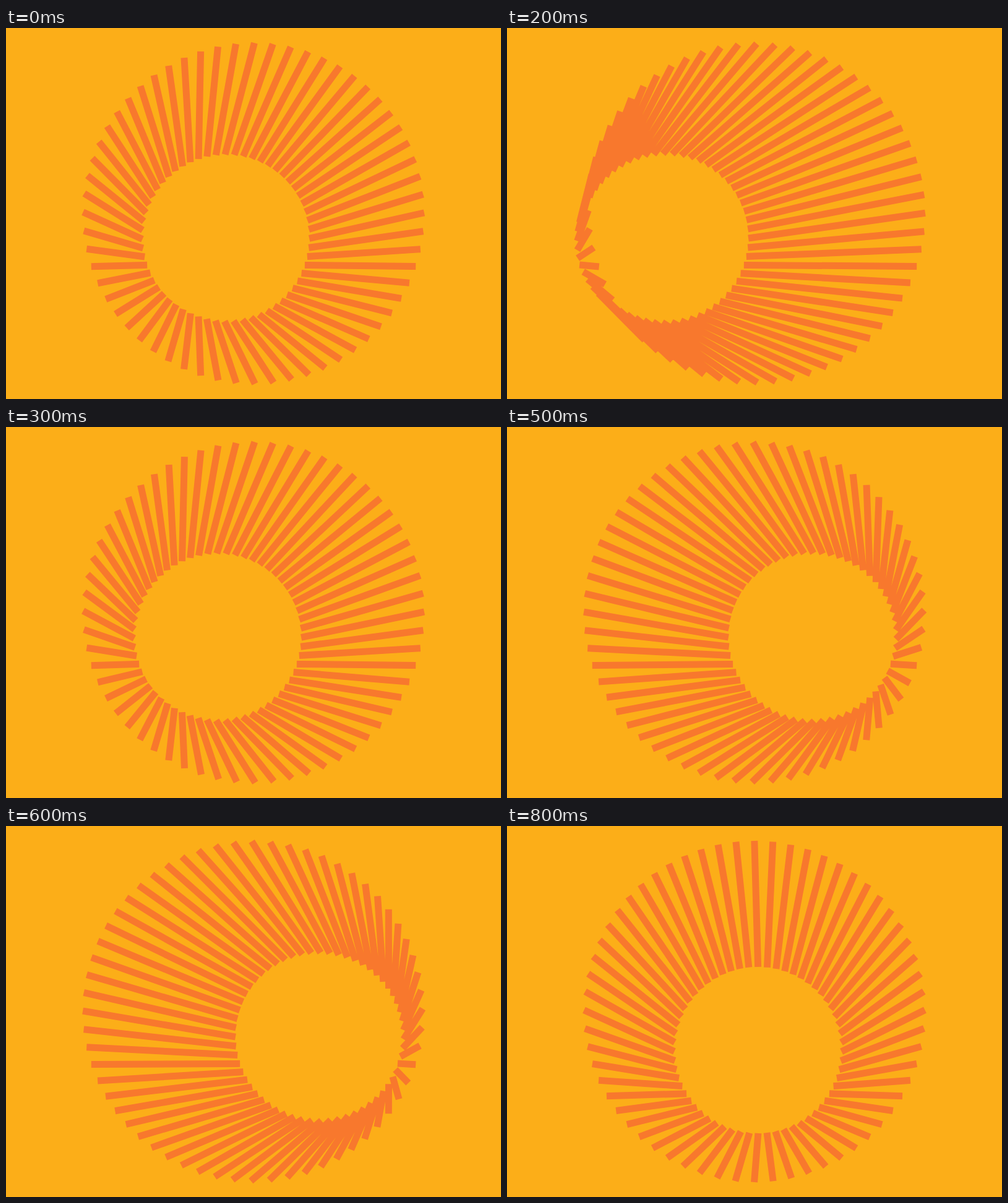
These frames come from a looping animation (800x600 px, 900 ms). An HTML page:

```html
<!DOCTYPE html>
<html lang="en">
<head>
<meta charset="utf-8">
<title>Ray ring</title>
<style>
  html, body { margin: 0; width: 100%; height: 100%; overflow: hidden; background: #fcae18; }
  svg { display: block; width: 100%; height: 100%; }
</style>
</head>
<body>
<svg viewBox="0 0 800 600">
  <rect width="800" height="600" fill="#fcae18"/>
  <path id="rays" fill="none" stroke="#f8782d" stroke-width="11" stroke-linecap="square"/>
</svg>
<script>
const QUARTER = 15, OUTER = 270.5, INNER = 140;
const STEP = 100, STEPS = 9, TURN = 5.5;
const KAPPA = 0.5523;
const rays = document.getElementById('rays');

// One coordinate of a quarter circle drawn as a cubic Bezier.
const arc = t => 3 * KAPPA * t * (1 - t) ** 2 + 3 * t * t * (1 - t) + t ** 3;

// Point i on a ring of four Bezier quarters, clockwise from the top.
function point(cx, cy, r, i) {
  const t = i % QUARTER / QUARTER;
  let x = r * arc(t), y = -r * arc(1 - t);
  for (let q = Math.floor(i / QUARTER); q > 0; q--) [x, y] = [-y, x];
  return (cx + x).toFixed(2) + ' ' + (cy + y).toFixed(2);
}

// The inner ring drifts left, swings right, then drifts back while sinking.
function hub(n) {
  const x = n < 3 ? 355.5 - 50 * n : Math.min(117.5 + 75 * n, 805.5 - 50 * n);
  const y = 339.2 + 3.7 * Math.max(0, n - TURN) ** 2;
  return [x, y];
}

function draw(ms) {
  const [x, y] = hub(Math.floor(ms / STEP) % STEPS);
  let d = '';
  for (let i = 0; i < 4 * QUARTER; i++) {
    d += `M${point(400, 300, OUTER, i)}L${point(x, y, INNER, i)}`;
  }
  rays.setAttribute('d', d);
}

const start = performance.now();
function tick() {
  draw(performance.now() - start);
  requestAnimationFrame(tick);
}
tick();
</script>
</body>
</html>
```
